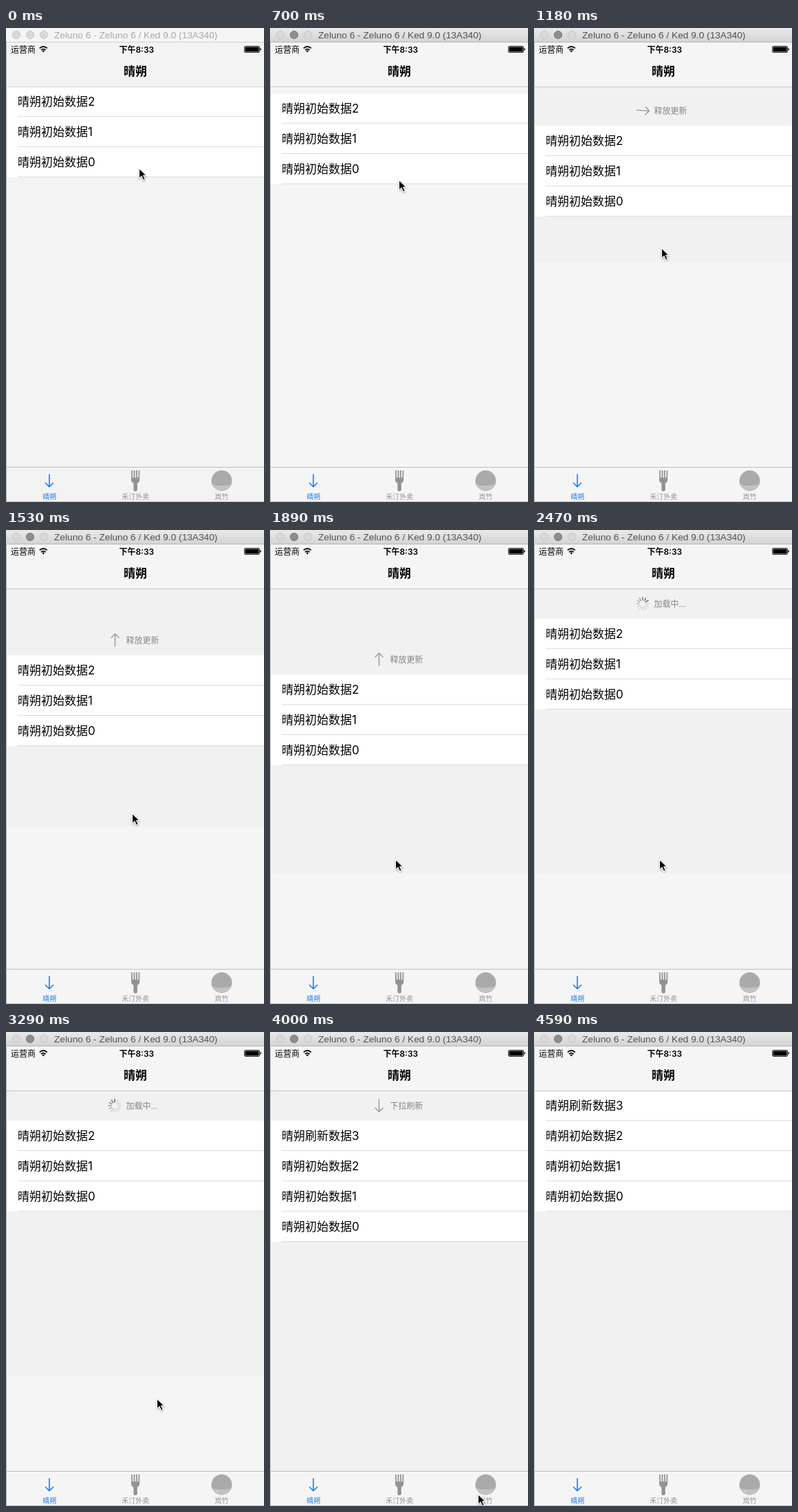
These frames come from a looping animation (375 by 689 pixels, 4.91 s). An HTML page:

```html
<!DOCTYPE html>
<html lang="zh-CN">
<head>
<meta charset="utf-8">
<title>下拉刷新</title>
<style>
  html, body { margin: 0; width: 100%; height: 100%; overflow: hidden; background: #f5f5f5; }
  svg { display: block; width: 375px; height: 689px; }
  text { font-family: Inter, "Noto Sans CJK SC", "Noto Sans CJK", sans-serif; }
  .bar { font: 13.7px "Liberation Sans", Arial, sans-serif; }
  .row { font-size: 17px; }
  .tab { font-size: 10px; text-anchor: middle; fill: #929292; }
  .line { fill: none; stroke-linecap: round; stroke-linejoin: round; }
</style>
</head>
<body>
<svg viewBox="0 0 375 689" xmlns="http://www.w3.org/2000/svg">
  <defs>
    <linearGradient id="lit" x2="0" y2="1">
      <stop offset="0" stop-color="#e9e9e9"/><stop offset="1" stop-color="#d4d4d4"/>
    </linearGradient>
    <path id="arrow" class="line" d="M0-9V9M-5.5 3.5L0 9L5.5 3.5"/>
  </defs>

  <rect id="back" width="375" height="689"/>
  <rect id="shade" y="85" width="375" fill="#f1f1f1"/>

  <g id="list">
    <g id="header">
      <use id="pull" href="#arrow" stroke="#999" stroke-width="1.4"/>
      <g id="spinner" transform="translate(158 63)"></g>
      <text id="hint" x="174.5" y="67.5" font-size="12" fill="#858585"></text>
    </g>
    <g id="rows"></g>
  </g>

  <g id="nav">
    <rect id="navFill" y="21" width="375" height="64"/>
    <rect id="navLine" y="85" width="375" height="1"/>
    <text x="7" y="35.5" font-size="12">运营商</text>
    <g class="line" stroke="#000" stroke-width="1.7">
      <path d="M48.8 29.4Q54.3 24.6 59.8 29.4M51 32Q54.3 29.2 57.6 32" stroke-linecap="butt"/>
    </g>
    <path d="M52.3 33.3Q54.3 31.8 56.3 33.3L54.3 35.5Z"/>
    <text x="189.8" y="35.5" font-size="12" font-weight="600" text-anchor="middle">下午8:33</text>
    <rect x="346.5" y="26.5" width="22" height="9" rx="1.5" fill="none" stroke="#000" stroke-width=".8"/>
    <rect x="347.5" y="27.5" width="20" height="7" rx=".5"/>
    <path d="M369.3 29.3Q371 29.6 371 31Q371 32.4 369.3 32.7Z"/>
    <text x="188" y="69" font-size="17" font-weight="600" text-anchor="middle">晴朔</text>
  </g>

  <g id="tabs">
    <rect id="tabFill" y="638" width="375" height="51"/>
    <rect y="638" width="375" height="1" fill="#bcbcbc"/>
    <use href="#arrow" x="63" y="658" stroke="#157efb" stroke-width="1.6"/>
    <text class="tab" x="63.3" y="684.7" style="fill:#157efb">晴朔</text>
    <path fill="#929292" d="M182 643h1.7v10.5h1.8V643h1.8v10.5h1.6V643h1.8v10.5h1.8V643h1.7v13.5q0 4-3.4 5V671q0 2.5-2.7 2.5t-2.7-2.5v-9.5q-3.4-1-3.4-5Z"/>
    <text class="tab" x="188.3" y="684.7">禾汀外卖</text>
    <circle cx="313.5" cy="658" r="15" fill="#aaa"/>
    <path fill="#c2c2c2" d="M299.6 663.2Q313.5 667.5 327.4 663.2A15 15 0 0 1 299.6 663.2Z"/>
    <text class="tab" x="313.5" y="684.7">岚竹</text>
    <rect y="688" width="375" height="1" fill="#c4c4c4"/>
  </g>

  <g id="window">
    <rect id="barFill" width="375" height="20"/>
    <rect id="barLine" y="20" width="375" height="1"/>
    <g id="lights"></g>
    <text id="barText" class="bar" x="70" y="15">Zeluno 6 - Zeluno 6 / Ked 9.0 (13A340)</text>
    <rect y="20" width="1" height="669" fill="#b4b4b4"/>
  </g>

  <path id="cursor" d="M0 0V14.6L3.5 11.4L6.2 17.2L8.8 16L6.2 10.4H10.7Z" stroke="#fff" stroke-width="1.1" style="filter:drop-shadow(0 1px 1px rgba(0,0,0,.35))"/>
</svg>
<script>
const LOOP = 4910, STEP = 117.75;
const $ = id => document.getElementById(id);
const set = (el, attrs) => { for (const a in attrs) el.setAttribute(a, attrs[a]); };

function add(parent, tag, attrs) {
  const el = document.createElementNS('http://www.w3.org/2000/svg', tag);
  set(el, attrs);
  parent.appendChild(el);
  return el;
}

// Keys are [step, value, ...], joined by straight lines.
const CURSOR = [[0, 193, 204], [3, 190, 207], [6, 187, 221], [10, 185, 320], [15, 182, 473],
  [16, 182, 479], [22, 182, 479], [27, 203, 500], [32, 285, 667], [34, 302, 672],
  [37, 312, 656], [38, 319, 672]];
const OFFSET = [[5, 0], [6, 10], [10, 57], [15, 123], [16, 125], [17, 125], [18, 110],
  [19, 66], [20, 46], [21, 44], [34, 44], [35, 30], [36, 8], [37, 0]];
const TURN = [[9, 0], [10, -86], [11, -180]];

function at(keys, k) {
  if (k <= keys[0][0]) return keys[0].slice(1);
  const i = keys.findIndex(key => key[0] >= k);
  if (i < 0) return keys[keys.length - 1].slice(1);
  const a = keys[i - 1], b = keys[i], p = (k - a[0]) / (b[0] - a[0]);
  return a.slice(1).map((v, j) => v + (b[j + 1] - v) * p);
}

const rows = [0, 1, 2, 3].map(i => {
  const g = add($('rows'), 'g', { transform: `translate(0 ${85 + 44 * i})` });
  add(g, 'rect', { width: 375, height: 44, fill: '#fff' });
  add(g, 'rect', { x: 17, y: 43, width: 358, height: 1, fill: '#dcdcde' });
  return { g, text: add(g, 'text', { class: 'row', x: 17, y: 27.5 }) };
});

const spokes = Array.from({ length: 12 }, (_, i) => add($('spinner'), 'path', {
  class: 'line', d: 'M0-5.2V-9', 'stroke-width': 1.9, transform: `rotate(${i * 30})`
}));

const lights = [15, 35, 55].map(cx => add($('lights'), 'circle', { cx, cy: 10, r: 5.6 }));

function drawWindow(active) {
  set($('back'), { fill: active ? '#f5f5f5' : '#f3f3f3' });
  set($('navFill'), { fill: active ? '#f5f5f5' : '#f3f3f3' });
  set($('navLine'), { fill: active ? '#c3c3c3' : '#d2d2d2' });
  set($('tabFill'), { fill: active ? '#f5f5f5' : '#f3f3f3' });
  set($('barFill'), { fill: active ? 'url(#lit)' : '#f5f5f5' });
  set($('barLine'), { fill: active ? '#b6b6b6' : '#d0d0d0' });
  set($('barText'), { fill: active ? '#505050' : '#a8a8a8' });
  lights.forEach((light, i) => {
    const dark = active && i === 1;
    set(light, { fill: dark ? '#8d8d8d' : '#d9d9d9', stroke: dark ? '#777' : '#c6c6c6' });
  });
}

function drawHeader(k) {
  const loading = k >= 18 && k < 33;
  const ready = k >= 9 && k < 18;
  $('hint').textContent = loading ? '加载中...' : ready ? '释放更新' : '下拉刷新';
  const angle = ready ? at(TURN, k)[0] : 0;
  set($('pull'), {
    transform: `translate(158.5 63) rotate(${angle})`,
    visibility: loading ? 'hidden' : 'visible'
  });
  set($('spinner'), { visibility: loading ? 'visible' : 'hidden' });
  const lead = Math.round(2 + (k - 21) * STEP * 0.012) + 24 * 6;
  spokes.forEach((spoke, i) => {
    const age = (lead - i) % 12;
    const tone = Math.min(216, 128 + age * 15);
    set(spoke, { stroke: `rgb(${tone},${tone},${tone})` });
  });
}

function drawRows(fresh) {
  const data = ['初始数据2', '初始数据1', '初始数据0'];
  if (fresh) data.unshift('刷新数据3');
  rows.forEach(({ g, text }, i) => {
    set(g, { visibility: i < data.length ? 'visible' : 'hidden' });
    text.textContent = i < data.length ? '晴朔' + data[i] : '';
  });
}

function draw(ms) {
  const k = Math.floor((ms + 10) / STEP);
  const [x, y] = at(CURSOR, k).map(Math.round);
  drawWindow(k >= 4);
  drawHeader(k);
  drawRows(k >= 33);
  set($('list'), { transform: `translate(0 ${Math.round(at(OFFSET, k)[0])})` });
  const edge = k <= 6 ? 85 : k < 33 ? Math.min(y + 20, 500) : 638;
  set($('shade'), { height: edge - 85 });
  set($('cursor'), { transform: `translate(${x + 0.5} ${y})`, visibility: k < 39 ? 'visible' : 'hidden' });
}

const start = performance.now();
function tick() {
  draw((performance.now() - start) % LOOP);
  requestAnimationFrame(tick);
}
tick();
</script>
</body>
</html>
```
